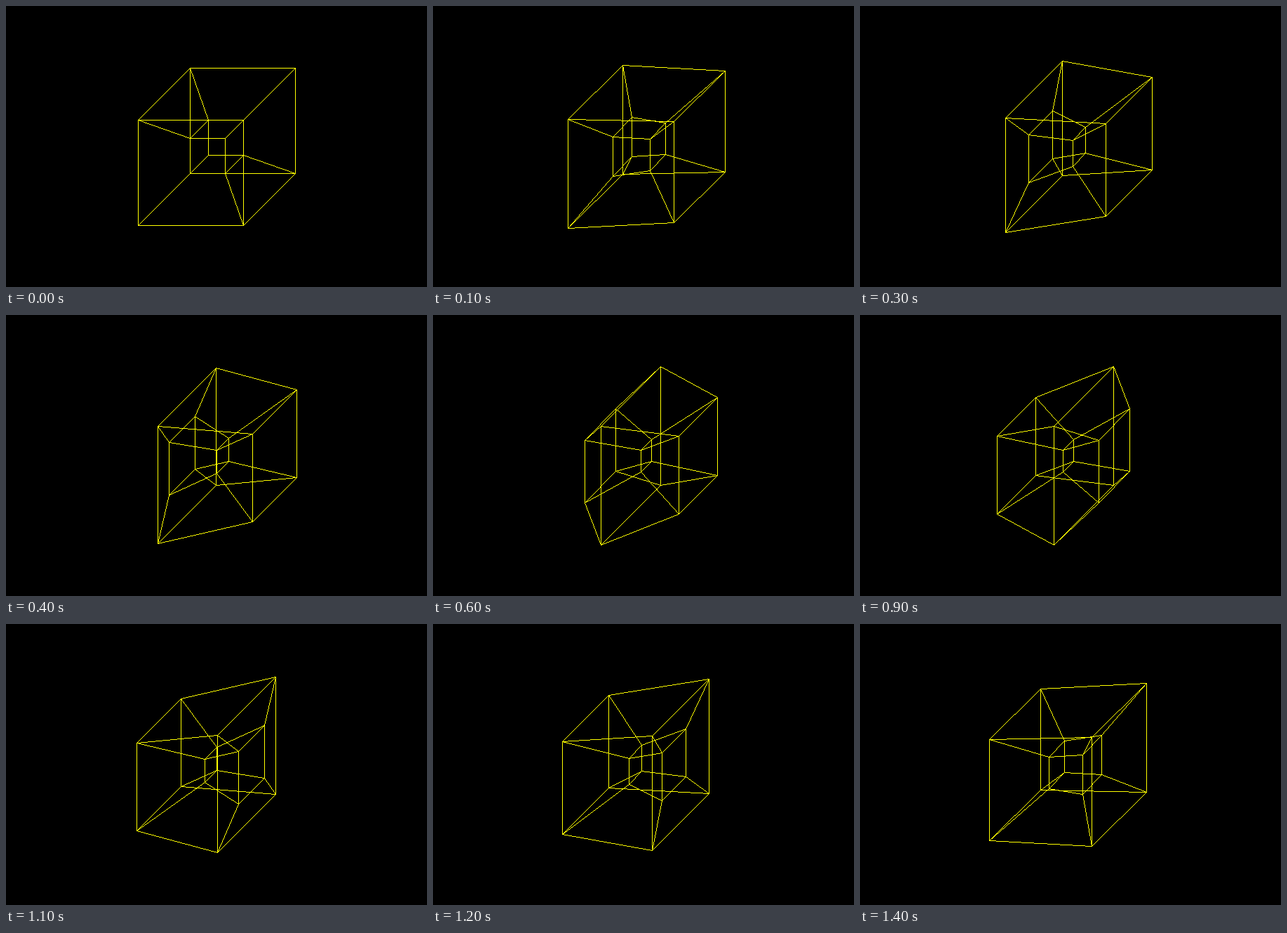
Write an HTML page with a canvas that moves like this. It is 600 by 400 pixels and loops after 1500 ms.

```html
<!DOCTYPE html>
<html lang="en">
<head>
<meta charset="utf-8">
<title>Rotating tesseract</title>
<style>
  html, body { margin: 0; width: 100%; height: 100%; overflow: hidden; background: #000; }
  canvas { display: block; width: 600px; height: 400px; image-rendering: pixelated; }
</style>
</head>
<body>
<canvas id="stage" width="600" height="400"></canvas>
<script>
const ctx = document.getElementById('stage').getContext('2d');
const STEPS = 15, STEP_MS = 100;

// Corners are numbered by bits: x, y, z, w.
const corners = Array.from({ length: 16 }, (_, i) =>
  [0, 1, 2, 3].map(bit => (i >> bit & 1) * 2 - 1));

const edges = [];
for (let i = 0; i < 16; i++)
  for (let bit = 1; bit < 16; bit <<= 1)
    if (!(i & bit)) edges.push([i, i | bit]);

// Rounds halves to the even neighbour.
function round(v) {
  const low = Math.floor(v);
  return v - low === 0.5 ? low + (low & 1) : Math.round(v);
}

// Turns in the x-w plane; w sets the size, z shifts diagonally.
function project([x, y, z, w], angle) {
  const c = Math.cos(angle), s = Math.sin(angle);
  const size = 50 + 25 * (w * c - x * s);
  return [
    round(300 + size * (x * c + w * s + z / 2)),
    round(200 + size * (y - z / 2))
  ];
}

// Bresenham line, one hard pixel wide.
function line([x, y], [x2, y2]) {
  const dx = Math.abs(x2 - x), dy = -Math.abs(y2 - y);
  const sx = Math.sign(x2 - x), sy = Math.sign(y2 - y);
  let err = dx + dy;
  for (;;) {
    ctx.fillRect(x, y, 1, 1);
    if (x === x2 && y === y2) return;
    const e = 2 * err;
    if (e >= dy) { err += dy; x += sx; }
    if (e <= dx) { err += dx; y += sy; }
  }
}

function draw(step) {
  const angle = step / STEPS * Math.PI / 2;
  const points = corners.map(p => project(p, angle));
  ctx.fillStyle = '#000';
  ctx.fillRect(0, 0, 600, 400);
  ctx.fillStyle = '#ff0';
  for (const [a, b] of edges) line(points[a], points[b]);
}

let start = null, shown = 0;
function tick(now) {
  if (start === null) start = now;
  const step = Math.floor(Math.max(0, now - start) / STEP_MS) % STEPS;
  if (step !== shown) draw(shown = step);
  requestAnimationFrame(tick);
}

draw(0);
requestAnimationFrame(tick);
</script>
</body>
</html>
```
